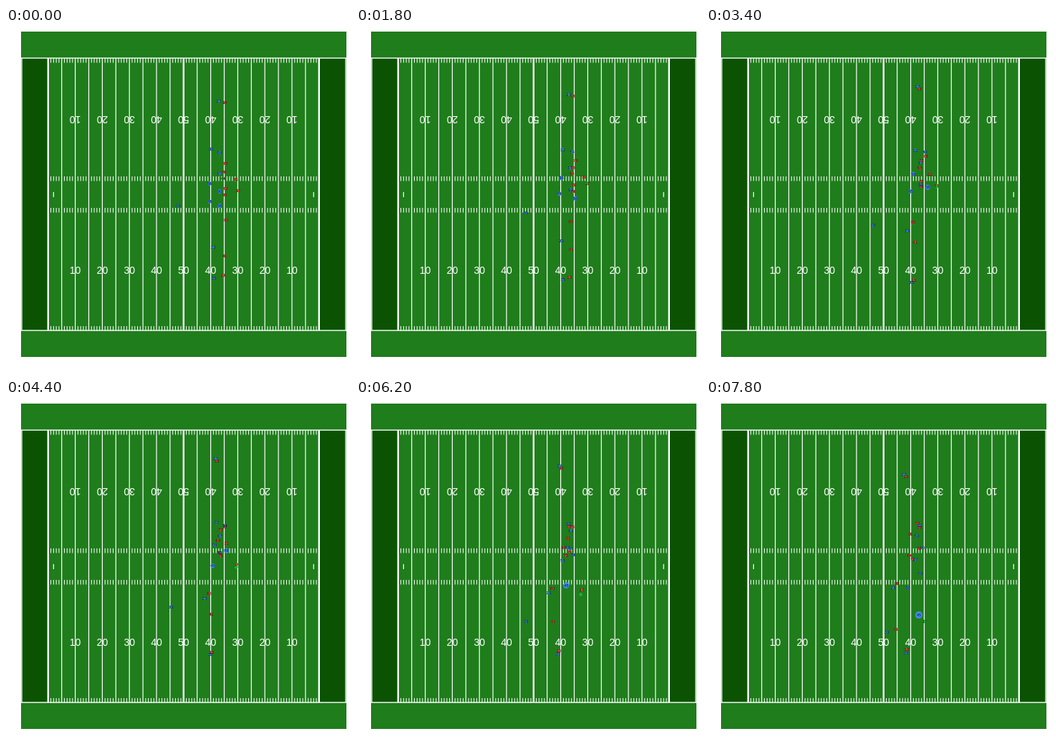
Write an HTML page with a canvas that moves like this. It is 480 by 480 pixels and loops after 8000 ms.

```html
<!DOCTYPE html>
<html lang="en">
<head>
<meta charset="utf-8">
<title>Football play</title>
<style>
html, body { margin: 0; width: 100%; height: 100%; overflow: hidden; background: #fff; }
canvas { display: block; width: 480px; height: 480px; }
</style>
</head>
<body>
<canvas id="stage" width="480" height="480"></canvas>
<script>
const LOOP = 8000, STEP = 200, END = LOOP - STEP;
const SNAP = 1200, BALL_LEAD = 250;
const LEFT = 58.8, YARD = 3.78, TOP = 42, BOTTOM = 422;
const FONT = '"Liberation Sans", Arial, sans-serif';
const RED = '#ee4038', BLUE = '#438be6', DOT = 2.1;
const ctx = document.getElementById('stage').getContext('2d');

// Smooth curve through evenly timed values, starting from rest.
function curve(values, t) {
  const last = values.length - 1;
  const pos = Math.min(t / END, 1) * last;
  const i = Math.min(Math.floor(pos), last - 1);
  const u = pos - i, v = 1 - u;
  const slope = k => {
    if (k === 0) return 0;
    if (k === last) return values[k] - values[k - 1];
    return (values[k + 1] - values[k - 1]) / 2;
  };
  return values[i] * (1 + 2 * u) * v * v + values[i + 1] * u * u * (3 - 2 * u) +
    u * v * (slope(i) * v - slope(i + 1) * u);
}

// A player runs through a few waypoints [x, y].
const player = (color, label, ...path) => ({
  color, label,
  at: t => ({
    x: curve(path.map(p => p[0]), t),
    y: curve(path.map(p => p[1]), t)
  })
});
const red = (...args) => player(RED, ...args);
const blue = (...args) => player(BLUE, ...args);

const carrier = red(17, [324, 227], [322, 216], [320, 242], [305, 309]);
const center = red(64, [303, 210], [297, 195], [284, 217]);
const blockers = [
  center,
  red(18, [305, 104], [296, 84], [279, 107]),
  red(78, [306, 189], [306, 178], [298, 178]),
  red(70, [304, 201], [300, 183], [295, 172]),
  red(72, [306, 224], [299, 213], [288, 222]),
  red(76, [305, 233], [300, 219], [297, 207]),
  red(31, [321, 211], [310, 202], [285, 187]),
  red(80, [307, 268], [286, 271], [266, 256]),
  red(41, [305, 318], [289, 298], [265, 320]),
  red(13, [303, 345], [288, 352], [280, 348])
];
const defenders = [
  blue(27, [297, 102], [294, 81], [276, 104]),
  blue(32, [286, 169], [293, 171], [298, 175]),
  blue(54, [298, 174], [306, 174], [294, 190]),
  blue(97, [298, 203], [299, 188], [292, 223]),
  blue(56, [284, 217], [288, 206], [291, 207], [282, 262]),
  blue(90, [298, 228], [300, 223], [298, 209], [302, 206]),
  blue(45, [284, 242], [284, 228], [291, 239], [297, 300]),
  blue(58, [298, 248], [309, 231], [306, 207], [299, 242]),
  blue(39, [240, 248], [235, 266], [231, 299], [252, 324]),
  blue(23, [289, 306], [279, 280], [261, 262]),
  blue(35, [290, 349], [286, 355], [279, 353])
];
const players = [...blockers, carrier, ...defenders];

const distance = (a, b) => Math.hypot(a.x - b.x, a.y - b.y);

// Defenders grow when near the carrier and not blocked.
function defenderSize(spot, t) {
  const near = 1 / (1 + (distance(spot, carrier.at(t)) / 28) ** 4);
  const gap = Math.min(...blockers.map(b => distance(spot, b.at(t))));
  return DOT + 3.1 * near * Math.min(1, gap / 13) ** 2;
}

function makeField() {
  const canvas = document.createElement('canvas');
  canvas.width = canvas.height = 480;
  const g = canvas.getContext('2d');
  const rect = (color, x, y, w, h) => {
    g.fillStyle = color;
    g.fillRect(x, y, w, h);
  };
  const line = (x, y1, y2, width) => rect('#fff', x - width / 2, y1, width, y2 - y1);

  rect('#fff', 0, 0, 480, 480);
  rect('#1f7d1c', 21, 5, 454, 454);
  for (const x of [22, 437]) rect('#0b5303', x, TOP, 37, BOTTOM - TOP);

  for (let yard = 0; yard <= 100; yard++) {
    const x = LEFT + yard * YARD;
    if (yard % 5 === 0) {
      line(x, TOP, BOTTOM, yard % 50 ? 1.2 : 2.4);
    } else {
      for (const y of [TOP, 207, 251, 416]) line(x, y, y + 6.5, 1);
    }
  }
  for (const yard of [2, 98]) line(LEFT + yard * YARD, 229, 236, 1.2);
  for (const x of [22, 474]) line(x, TOP, BOTTOM, 1.3);
  for (const y of [TOP, BOTTOM]) rect('#fff', 21, y - 0.7, 454, 1.4);

  g.fillStyle = '#fff';
  g.font = '14px ' + FONT;
  g.textAlign = 'center';
  for (let yard = 10; yard < 100; yard += 10) {
    const x = LEFT + yard * YARD;
    const text = 50 - Math.abs(50 - yard);
    g.fillText(text, x, 343);
    g.save();
    g.translate(x, 123);
    g.rotate(Math.PI);
    g.fillText(text, 0, 0);
    g.restore();
  }
  return canvas;
}

const field = makeField();

// The ball is snapped from the center, then leads the carrier.
function drawBall(t) {
  const from = center.at(0), to = carrier.at(Math.min(t + BALL_LEAD, END));
  const u = Math.min(1, t / SNAP);
  const x = from.x + (to.x - from.x) * u;
  const y = from.y + (to.y - from.y) * u;
  const r = 2.8;
  ctx.fillStyle = '#16b536';
  ctx.beginPath();
  ctx.moveTo(x, y - r);
  ctx.lineTo(x + r, y);
  ctx.lineTo(x, y + r);
  ctx.lineTo(x - r, y);
  ctx.fill();
}

function draw(t) {
  ctx.drawImage(field, 0, 0);
  for (const p of players) {
    const spot = p.at(t);
    const r = p.color === BLUE ? defenderSize(spot, t) : DOT;
    ctx.fillStyle = p.color;
    ctx.beginPath();
    ctx.arc(spot.x, spot.y, r, 0, 2 * Math.PI);
    ctx.fill();
  }
  drawBall(t);
  ctx.font = '5.5px ' + FONT;
  ctx.textAlign = 'center';
  for (const p of players) {
    const { x, y } = p.at(t);
    ctx.fillStyle = p.color === BLUE ? '#00104a' : '#3a0505';
    ctx.fillText(p.label, x, y + 2);
  }
}

const start = performance.now();
function frame() {
  const t = (performance.now() - start) % LOOP;
  draw(Math.floor(t / STEP) * STEP);
  requestAnimationFrame(frame);
}
frame();
</script>
</body>
</html>
```
